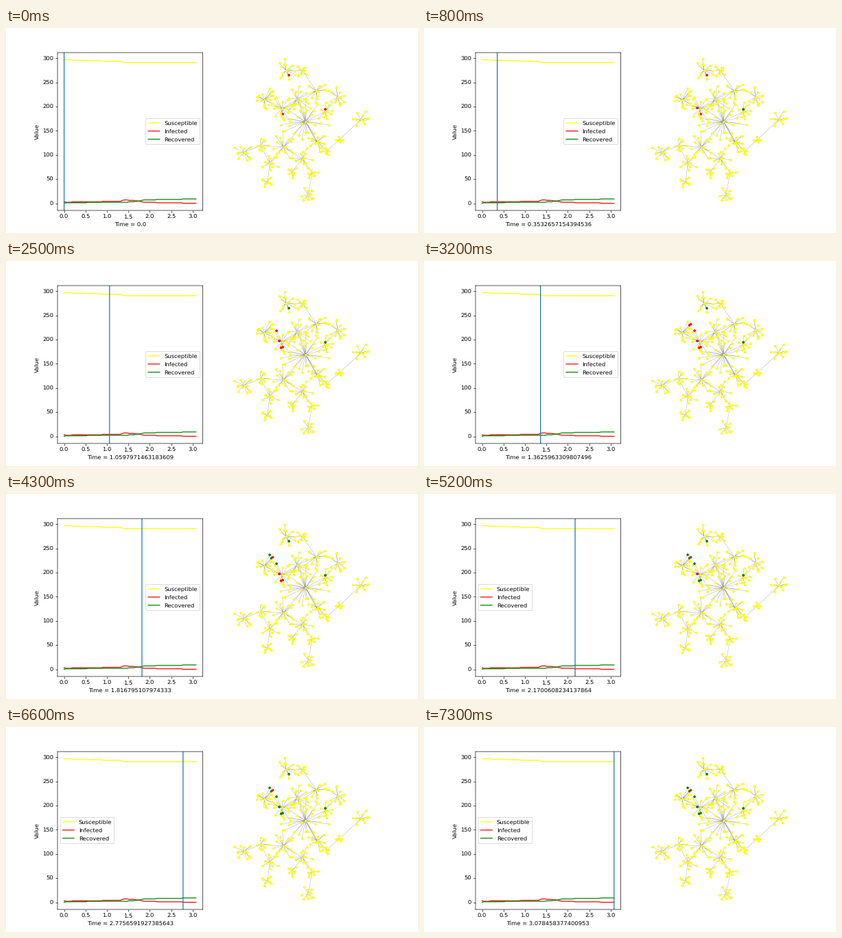
Animation of 600x300 px, one loop 7.4 s. Source, as a matplotlib script:

```python
import math

import matplotlib.pyplot as plt
import numpy as np
from matplotlib.animation import FuncAnimation
from matplotlib.collections import LineCollection

N_FRAMES = 74
N_NODES = 300
TIMES = np.linspace(0, 3.078458377400953, 62)
NEVER = len(TIMES)
YELLOW, RED, GREEN = "yellow", "red", "green"
GOLDEN_ANGLE = math.pi * (3 - math.sqrt(5))
LEAVES_PER_PIXEL = 0.85

# x, y, step at which the dot turns red, step at which it turns green
CASES = np.array([
    (412, 69, 0, 20), (465, 119, 0, 1), (403, 126, 0, 37),
    (398, 117, 4, 55), (400.5, 127, 11, 43), (394, 102, 18, 30),
    (386.5, 94, 27, 33), (388.5, 92.5, 27, NEVER), (384, 89, 28, 35),
])
# The chart counts recoveries as they happen; some dots follow later
RECOVERY_STEPS = np.array([1, 11, 30, 33, 35, 36, 37, 43, 55])

# x, y, reach of the leaves; the centre comes first
HUBS = np.array([
    (436, 137, 36), (402, 118, 20), (424, 104, 20), (432, 191, 15),
    (347, 182, 15), (465, 122, 13), (517, 134, 13), (376, 105, 16),
    (408, 62, 16), (432, 63, 9), (483, 101, 15), (452, 92, 18),
    (486, 163, 6), (467, 180, 6), (384, 198, 13), (381, 226, 9),
    (416, 211, 8), (446, 212, 8), (440, 244, 12), (371, 172, 11),
    (404, 174, 20), (454, 166, 15),
], float)


def build_network():
    """Hubs join the nearest hub closer to the centre; leaves spiral round hubs."""
    rng = np.random.default_rng(7)
    from_centre = np.hypot(*(HUBS[:, :2] - HUBS[0, :2]).T)
    hubs = HUBS[np.argsort(from_centre)]
    centres = hubs[:, :2]

    def nearest(point, candidates):
        return candidates[np.hypot(*(candidates - point).T).argmin()]

    nodes, edges = list(centres), []
    for i, (x, y, reach) in enumerate(hubs):
        if i:
            edges.append([centres[i], nearest(centres[i], centres[:i])])
        count = round(reach * LEAVES_PER_PIXEL)
        for leaf in range(count):
            angle = leaf * GOLDEN_ANGLE + rng.uniform(-0.6, 0.6)
            radius = reach * math.sqrt((leaf + 1) / count) * rng.uniform(0.7, 1.2)
            point = np.array([x + radius * math.cos(angle),
                              y + radius * math.sin(angle)])
            nodes.append(point)
            edges.append([centres[i], point])
    edges += [[case, nearest(case, centres)] for case in CASES[:, :2]]
    return np.array(nodes), edges


plt.rcParams.update({"text.hinting": "none", "path.snap": False})
fig = plt.figure(figsize=(10, 5), dpi=60)
chart = fig.add_subplot(121)

steps = np.arange(len(TIMES))[:, None]
ever_infected = (CASES[:, 2] <= steps).sum(axis=1)
recovered = (RECOVERY_STEPS <= steps).sum(axis=1)
chart.plot(TIMES, N_NODES - ever_infected, color=YELLOW, label="Susceptible")
chart.plot(TIMES, ever_infected - recovered, color=RED, label="Infected")
chart.plot(TIMES, recovered, color=GREEN, label="Recovered")
cursor = chart.axvline(0)
chart.set_ylabel("Value")
chart.legend(loc="best")

network = fig.add_axes([0, 0, 1, 1])
network.set(xlim=(0, 600), ylim=(300, 0))
network.axis("off")
nodes, edges = build_network()
network.add_collection(
    LineCollection(edges, colors="black", linewidths=0.4, alpha=0.45, zorder=1))
network.scatter(*nodes.T, s=11, c=YELLOW, zorder=2)
case_dots = network.scatter(*CASES[:, :2].T, s=11, c=YELLOW, zorder=3)


def status_color(step, start, end):
    if step < start:
        return YELLOW
    return RED if step < end else GREEN


def update(frame):
    # Six displayed frames cover five time steps
    step = math.ceil(frame * 5 / 6 - 0.5)
    time = float(TIMES[step])
    cursor.set_xdata([time, time])
    chart.set_xlabel(f"Time = {time}")
    case_dots.set_color([status_color(step, start, end)
                         for start, end in CASES[:, 2:]])
    return cursor, case_dots


animation = FuncAnimation(fig, update, frames=N_FRAMES, interval=100,
                          repeat=True, repeat_delay=0, blit=False)
plt.show()
```
